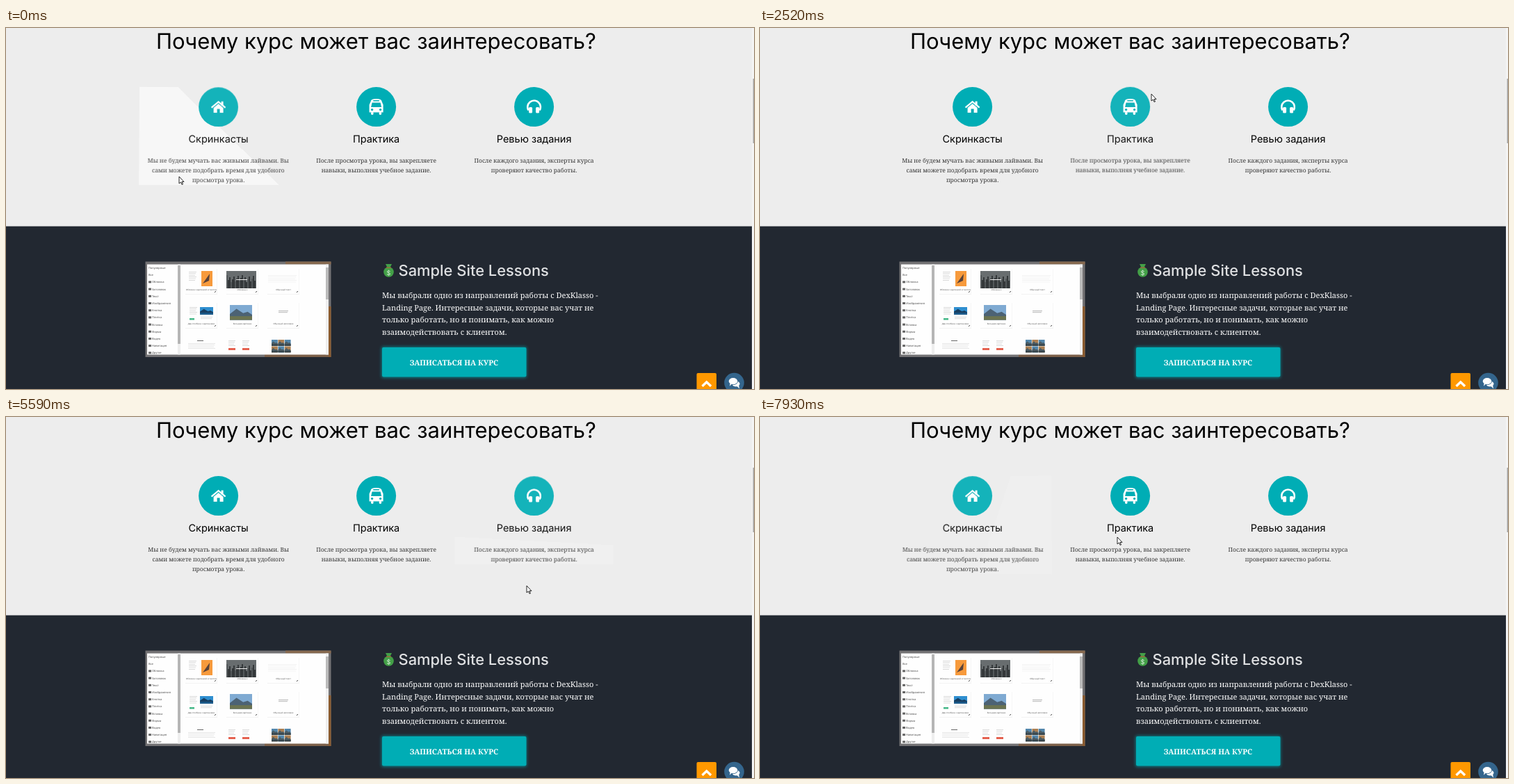
These frames come from a looping animation (1076x520 px, 8 s). An HTML page:

```html
<!DOCTYPE html>
<html lang="ru">
<head>
<meta charset="utf-8">
<style>
  html, body { margin: 0; width: 100%; height: 100%; overflow: hidden; background: #ededed; }
  svg { position: absolute; left: 0; top: 0; overflow: visible; text-rendering: geometricPrecision; }
  .card { position: absolute; top: 85px; width: 227px; }
  .glare { position: absolute; inset: 0; }
  .sans { font-family: Inter, "Open Sans", sans-serif; }
  .serif { font-family: "Noto Serif", serif; }
  .tiny { font-family: "Open Sans", sans-serif; }
  .mid { text-anchor: middle; }
</style>
</head>
<body>
<svg id="page" width="1076" height="520"></svg>
<div id="cards"></div>
<svg id="pointer" width="10" height="14">
  <path d="M0 0V10L2.500 8 4 11.500 5.500 11 4 7.500H7Z" fill="#fff" stroke="#111" stroke-width=".9"/>
</svg>
<script>
const TEAL = '#00adb5', NAVY = '#222831';
const byId = id => document.getElementById(id);
const rect = (x, y, w, h, fill, extra = '') =>
  `<rect x="${x}" y="${y}" width="${w}" height="${h}" fill="${fill}" ${extra}/>`;
const circle = (x, y, r, fill) => `<circle cx="${x}" cy="${y}" r="${r}" fill="${fill}"/>`;
const ellipse = (x, y, rx, ry, fill) => `<ellipse cx="${x}" cy="${y}" rx="${rx}" ry="${ry}" fill="${fill}"/>`;
const path = (d, fill, extra = '') => `<path d="${d}" fill="${fill}" ${extra}/>`;
const stroke = (d, color, width) => path(d, 'none', `stroke="${color}" stroke-width="${width}"`);
const text = (x, y, size, cls, fill, str, extra = '') =>
  `<text x="${x}" y="${y}" font-size="${size}" class="${cls}" fill="${fill}" ${extra}>${str}</text>`;
const lines = (x, y, step, size, cls, fill, list) =>
  list.map((s, i) => text(x, y + i * step, size, cls, fill, s)).join('');
const repeat = (n, draw) => Array.from({length: n}, (_, i) => draw(i)).join('');

// Pale strokes standing in for unreadable copy
const copy = (x, y, w, n, fill = '#ccc') => repeat(n, i => rect(x, y + i * 2.4, w - i % 3, .7, fill));
const photo = (x, y, w, h, sky, hill, ground) => rect(x, y, w, h, sky)
  + path(`M${x} ${y + h * .6}l${w * .3} ${-h * .35} ${w * .3} ${h * .3} ${w * .2} ${-h * .1} ${w * .2} ${h * .2}V${y + h}H${x}Z`, hill)
  + rect(x, y + h * .75, w, h * .25, ground);

function builderShot() {
  const menu = ['Популярные', 'Все', 'Обложка', 'Заголовок', 'Текст', 'Изображения', 'Кнопка',
    'Плитка', 'Вставка', 'Форма', 'Видео', 'Навигация', 'Другое'];
  const blocks = ['Обложка с картинкой и текстом', 'Обложка 2', 'Обычный текст',
    'Два столбика с картинками', 'Большая картинка', 'Обычный заголовок'];
  const frame = rect(200.5, 336.5, 267, 137.5, '#737274') + rect(402, 336.5, 65.5, 4, '#86694f')
    + rect(464, 401, 3.5, 73, '#8b5c30') + rect(372, 470, 92, 4, '#7c6049')
    + rect(203, 340.5, 261, 130, '#fefefe')
    + rect(247, 340.5, 4, 130, '#eee') + rect(247, 342, 4, 113, '#b5b5b5')
    + rect(460, 340.5, 4, 130, '#eee') + rect(460, 345, 4, 46, '#bbb');
  const sidebar = menu.map((name, i) => {
    const y = 347 + i * 10.2, icon = i > 1;
    return (icon ? rect(205, y - 3, 4, 3, '#666') : '') + text(icon ? 210 : 205, y, 4, 'tiny', '#444', name);
  }).join('');
  const captions = blocks.map((name, i) => {
    const x = 281 + i % 3 * 59, y = 378 + (i / 3 | 0) * 49;
    return text(x, y, 2.9, 'tiny mid', '#444', name) + rect(x - 23, y + 5.5, 46, .5, '#e4e4e4')
      + rect(x + 22, y - 31, .5, 37, '#eee') + stroke(`M${x + 19} ${y + 3}l2 -2`, '#444', 1);
  }).join('');
  const firstRow = copy(263, 351, 11, 6) + rect(281, 350, 16, 22, '#f79a3c')
    + path('M283 368l10 -14 -1 10z', '#594239') + rect(317, 350, 43, 25, '#686d6f')
    + repeat(21, i => rect(317 + i * 2, 356 + i * 7 % 11, 2, 19 - i * 7 % 11, i % 3 ? '#34383a' : '#53585a'))
    + rect(331, 362, 16, 1, '#eee') + copy(377, 356, 41, 5, '#eee');
  const secondRow = copy(264, 402, 11, 5) + rect(264, 418, 7, 2.5, '#43b787')
    + photo(279, 402, 19, 11, '#2f8fd0', '#173e61', '#1d5c8c') + copy(280, 416, 17, 2)
    + photo(322, 399, 32, 21.5, '#7faad2', '#4c6274', '#6b7350') + copy(392, 407, 14, 2, '#999');
  const thirdRow = rect(275, 450, 9, 1, '#666') + copy(262, 454, 39, 4, '#ddd')
    + repeat(2, i => copy(320 + i * 20, 450, 10, 4) + rect(320 + i * 20, 461, 10, 3, '#e4614f'))
    + repeat(6, i => photo(382 + i % 3 * 9.4, 449 + (i / 3 | 0) * 9.5, 8.8, 8.8,
      `hsl(${i % 2 ? 30 : 205} 35% 50%)`, '#4c5c64', '#344249'));
  return frame + sidebar + captions + firstRow + secondRow + thirdRow;
}

const moneyBag = ellipse(550.5, 351.5, 7.3, 7.3, '#43a047') + path('M546 340h9l-3 6h-3z', '#43a047')
  + rect(547, 344.5, 7, 1.5, '#9c6b3c') + text(550.5, 355.5, 9, 'sans mid', '#e8f5e9', '$');
const bubble = (x, y, rx, ry, tail) => ellipse(x, y, rx, ry, '#fff') + path(`M${x} ${y + 2}l${tail} 5 ${-tail * .2} -6z`, '#fff');

byId('page').innerHTML =
  '<filter id="glow" x="-10%" y="-30%" width="120%" height="160%"><feGaussianBlur stdDeviation="2"/></filter>'
  + rect(0, 0, 1076, 520, '#ededed') + rect(0, 285.6, 1076, 235, NAVY)
  + rect(1073, 0, 3, 520, '#f4f4f4') + rect(1074.5, 73, 1.5, 93, '#a5a5a5')
  + text(532.5, 30.3, 31, 'sans mid', '#000', 'Почему курс может вас заинтересовать?')
  + builderShot() + moneyBag
  + text(564.5, 357, 21.9, 'sans', '#dfe0e2', 'Sample Site Lessons', 'font-weight="500"')
  + lines(541, 389, 17.7, 11, 'serif', '#fff', [
    'Мы выбрали одно из направлений работы с DexKlasso -',
    'Landing Page. Интересные задачи, которые вас учат не',
    'только работать, но и понимать, как можно',
    'взаимодействовать с клиентом.'])
  + rect(540, 459, 209, 45, TEAL, 'rx="3" filter="url(#glow)" opacity=".6"')
  + rect(541, 460, 207.5, 42.5, TEAL, 'rx="2"')
  + text(644.5, 485.5, 10.8, 'serif mid', '#fff', 'ЗАПИСАТЬСЯ НА КУРС', 'font-weight="700"')
  + rect(993.5, 497, 28.5, 26, '#ff9800', 'rx="2"') + stroke('M1001.500 516l6.300 -6 6.300 6', '#fff', 3.4)
  + circle(1047.5, 511, 14.3, '#34658c')
  + bubble(1050, 512.5, 5.5, 4, 5) + ellipse(1046, 508.7, 7, 5.2, '#34658c') + bubble(1046, 508.7, 6.3, 4.6, -5);

// Icons are drawn around the circle's centre
const icons = [
  stroke('M-10 1L0 -7.500 10 1', '#fff', 2.2) + rect(4, -8, 3, 6, '#fff')
    + path('M-7 1.500L0 -4.500 7 1.500V8.500H2V3H-2V8.500H-7Z', '#fff'),
  path('M-8 -7.500Q-8 -11.500 0 -11.500T8 -7.500L10 -3V8H-10V-3Z', '#fff')
    + rect(-7.5, 7, 3.4, 4.5, '#fff', 'rx="1.5"') + rect(4.1, 7, 3.4, 4.5, '#fff', 'rx="1.5"')
    + rect(-4.5, -9.6, 9, 1.5, TEAL, 'rx=".7"') + path('M-6 -6H6L7.500 .5H-7.500Z', TEAL)
    + circle(-6, 4, 1.7, TEAL) + circle(6, 4, 1.7, TEAL),
  stroke('M-8 5A9.300 9.300 0 1 1 8 5', '#fff', 2.6)
    + rect(-7.5, .5, 5, 8.5, '#fff', 'rx="1.5"') + rect(2.5, .5, 5, 8.5, '#fff', 'rx="1.5"')
];

const cards = [
  ['Скринкасты', 'Мы не будем мучать вас живыми лайвами. Вы', 'сами можете подобрать время для удобного', 'просмотра урока.'],
  ['Практика', 'После просмотра урока, вы закрепляете', 'навыки, выполняя учебное задание.'],
  ['Ревью задания', 'После каждого задания, эксперты курса', 'проверяют качество работы.']
].map(([title, ...body], i) => {
  const el = document.createElement('div'), x = 192 + i * 227.2, h = 98.5 + body.length * 14.3;
  el.className = 'card';
  el.style.cssText = `left:${x}px;height:${h}px`;
  el.innerHTML = `<div class="glare"></div><svg width="227" height="${h}">
    <g transform="translate(113.6 28.6)">${circle(0, 0, 28.5, TEAL)}${icons[i]}</g>`
    + text(113.6, 80.4, 14.5, 'sans mid', '#000', title)
    + lines(113.6, 108.5, 14.3, 8.5, 'serif mid', '#333', body) + '</svg>';
  byId('cards').append(el);
  return {el, x, h, glare: el.firstChild};
});

const LOOP = 8000, STEP = 146.2, MAX_TILT = 4;

const route = [[0, 249, 214], [8, 330, 70], [11, 353, 91], [17, 563, 95], [24, 605, 205], [25, 680, 243],
  [33, 770, 120], [37, 757, 205], [38, 749, 243], [48, 449, 164], [52, 340, 180], [53, 405, 189], [54, 514, 173]];

function pointerAt(step) {
  const i = Math.max(1, route.findIndex(p => p[0] >= step));
  const [t0, x0, y0] = route[i - 1], [t1, x1, y1] = route[i];
  const k = Math.max(0, (step - t0) / (t1 - t0));
  return [x0 + (x1 - x0) * k, y0 + (y1 - y0) * k];
}

// The cards react one step after the pointer; the glare starts strong and settles
function render(time) {
  const step = Math.floor(time % LOOP / STEP), settle = Math.exp(-step / 4);
  const [px, py] = pointerAt(step), [mx, my] = pointerAt(step - 1);
  byId('pointer').style.transform = `translate(${px}px,${py}px)`;
  for (const {el, x, h, glare} of cards) {
    const dx = mx - x - 113.5, dy = my - 85 - h / 2;
    const over = Math.abs(dx) < 113.5 && Math.abs(dy) < h / 2;
    const angle = Math.atan2(dx, -dy), alpha = (.18 + .5 * settle) * (dy / h + .5);
    el.style.opacity = over ? .92 : 1;
    el.style.transform = over
      ? `perspective(1000px) rotateX(${MAX_TILT * dy * 2 / h}deg) rotateY(${-MAX_TILT * dx / 113.5}deg)` : 'none';
    glare.style.background = over
      ? `linear-gradient(${angle}rad, transparent calc(50% + ${30 - 40 * settle}px), rgba(255,255,255,${alpha}) 0)` : 'none';
  }
}

function tick() {
  render(performance.now());
  requestAnimationFrame(tick);
}
tick();
</script>
</body>
</html>
```
